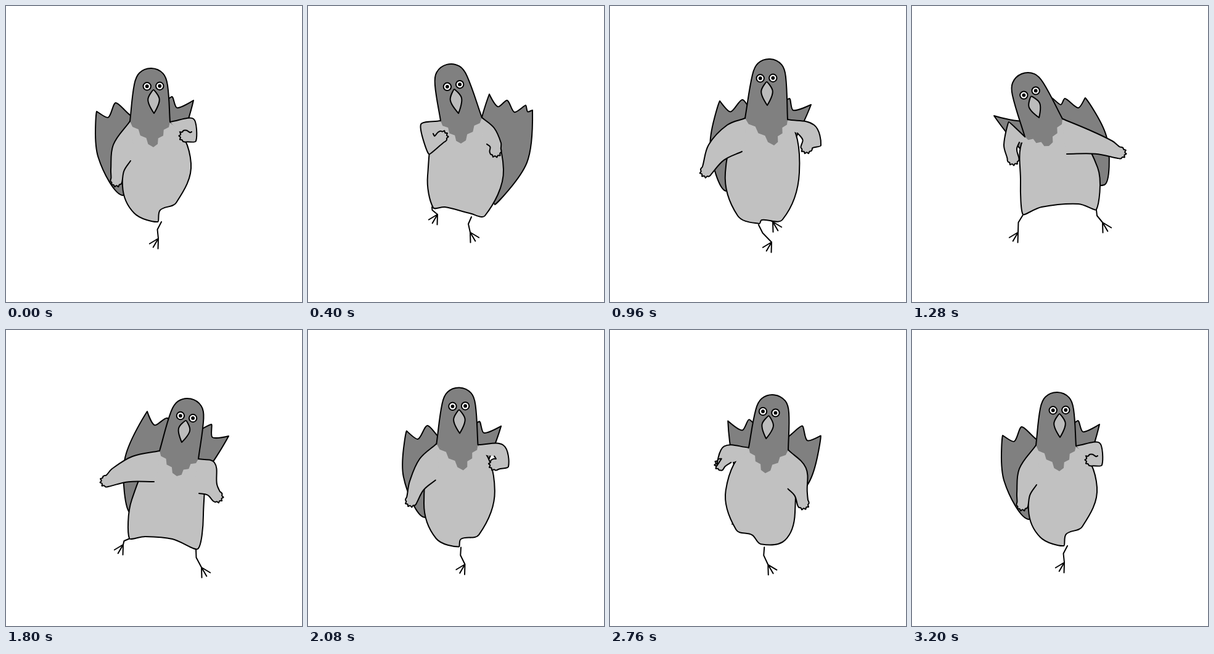
Write an HTML page with a canvas that moves like this. It is 480 px wide and 480 px high and loops after 3240 ms.

```html
<!DOCTYPE html>
<html>
<head>
<meta charset="utf-8">
<style>
html, body { margin: 0; width: 100%; height: 100%; overflow: hidden; background: #fff; }
canvas { display: block; width: 100vw; height: 100vh; }
</style>
</head>
<body>
<canvas id="stage" width="480" height="480"></canvas>
<script>
const ctx = document.getElementById('stage').getContext('2d');
const DARK = '#808080', LIGHT = '#c1c1c1', INK = '#000';
const CYCLE = 1080, STEP = 40, CROWN = 27, HAND = 9.5;

// Key joints as x,y pairs. Arms: two outer bends, hand, armpit. Legs: hip, foot.
const hop = {
  crown: [235,128], neck: [201,187, 266,188], tip: [239,229], face: [239,130], beak: [240,174],
  body: [189,292, 208,336, 246,350, 250,331, 276,319, 300,255],
  base: [190,307], peaks: [147,171, 178,157, 269,147, 304,153],
  armL: [174,225, 170,265, 179,283, 202,251], armR: [304,183, 308,219, 291,211, 301,204],
  legL: [252,350, 247,377], legR: [262,310, 262,295]
};
const leanLeft = {
  crown: [188,135], neck: [183,212, 244,183], tip: [222,227], face: [191,141], beak: [206,181],
  body: [176,285, 180,338, 210,326, 270,321, 299,330, 301,262],
  base: [312,290], peaks: [133,178, 222,147, 248,150, 281,149],
  armL: [157,188, 149,225, 164,248, 174,221], armR: [285,200, 325,219, 337,238, 251,240],
  legL: [181,337, 172,367], legR: [299,331, 309,351]
};
const punch = {
  crown: [232,121], neck: [215,186, 282,181], tip: [248,223], face: [236,129], beak: [244,174],
  body: [194,275, 203,327, 222,326, 262,336, 287,340, 317,265],
  base: [303,322], peaks: [294,143, 323,153, 353,161, 364,169],
  armL: [183,192, 196,240, 217,212, 203,207], armR: [302,198, 313,222, 304,235, 290,224],
  legL: [201,326, 210,338], legR: [265,342, 263,367]
};
const leanRight = {
  crown: [294,138], neck: [249,196, 312,209], tip: [277,237], face: [293,141], beak: [285,182],
  body: [204,275, 200,338, 226,335, 270,339, 311,355, 320,300],
  base: [202,297], peaks: [229,132, 262,143, 333,153, 361,172],
  armL: [205,205, 172,225, 163,245, 240,246], armR: [338,215, 342,250, 342,270, 313,265],
  legL: [201,338, 190,348], legR: [308,355, 317,385]
};
const rise = {
  crown: [258,113], neck: [219,182, 288,184], tip: [266,226], face: [254,117], beak: [255,161],
  body: [187,270, 207,340, 242,353, 246,347, 280,346, 307,270],
  base: [188,300], peaks: [178,154, 215,152, 291,150, 326,160],
  armL: [190,193, 160,225, 156,268, 214,236], armR: [331,193, 342,226, 319,229, 304,206],
  legL: [241,355, 262,383], legR: [262,346, 264,350]
};

const pairs = a => Array.from({ length: a.length / 2 }, (_, i) => [a[2 * i], a[2 * i + 1]]);

// Left-right reflection: limbs swap sides, outlines run the other way.
function mirror(pose) {
  const out = {};
  for (const part in pose) {
    const pts = pairs(pose[part]).map(([x, y]) => [482 - x, y]);
    const limb = /^(arm|leg)/.test(part);
    const name = limb ? part.slice(0, 3) + (part.endsWith('L') ? 'R' : 'L') : part;
    out[name] = (limb ? pts : pts.reverse()).flat();
  }
  return out;
}

const keys = [
  [0, hop], [200, leanLeft], [400, punch], [540, mirror(hop)],
  [720, leanRight], [960, rise], [1040, hop]
];

function keyAt(i) {
  const n = keys.length, turn = Math.floor(i / n);
  const [t, pose] = keys[i - turn * n];
  return [t + turn * CYCLE, pose];
}

// Harmonic mean keeps the motion between keys free of overshoot.
const slope = (a, b) => a * b > 0 ? 2 * a * b / (a + b) : 0;

function poseAt(t) {
  let i = keys.length - 1;
  while (keys[i][0] > t) i--;
  const [k0, k1, k2, k3] = [-1, 0, 1, 2].map(d => keyAt(i + d));
  const h = k2[0] - k1[0], u = (t - k1[0]) / h;
  const w = u * u * (3 - 2 * u), out = {};
  for (const part in hop) {
    out[part] = pairs(k1[1][part].map((b, j) => {
      const a = k0[1][part][j], c = k2[1][part][j], d = k3[1][part][j];
      const s = (c - b) / h;
      const m1 = slope((b - a) / (k1[0] - k0[0]), s);
      const m2 = slope(s, (d - c) / (k3[0] - k2[0]));
      return b + (c - b) * w + h * u * (1 - u) * ((1 - u) * m1 - u * m2);
    }));
  }
  return out;
}

const lerp = (a, b, u) => [a[0] + (b[0] - a[0]) * u, a[1] + (b[1] - a[1]) * u];
const dist = (a, b) => Math.hypot(b[0] - a[0], b[1] - a[1]) || 1;
const angle = (a, b) => Math.atan2(b[1] - a[1], b[0] - a[0]);
const polar = (c, r, a) => [c[0] + r * Math.cos(a), c[1] + r * Math.sin(a)];
const toward = (a, b, d) => lerp(a, b, d / dist(a, b));
// Point at u along a-b, pushed sideways by d.
const beside = (a, b, u, d) => polar(lerp(a, b, u), d, angle(a, b) - Math.PI / 2);

// Smooth curve through points; sharp turns stay sharp.
function trace(pts, closed) {
  const n = pts.length;
  const at = i => closed ? pts[(i + n) % n] : pts[Math.max(0, Math.min(n - 1, i))];
  const handle = i => {
    const a = at(i - 1), b = at(i), c = at(i + 1);
    const turn = a === b || b === c ? 0 : angle(b, c) - angle(a, b);
    const k = Math.max(0, Math.min(1, Math.cos(turn) + 0.6)) * 0.35;
    return [(c[0] - a[0]) / dist(a, c) * k, (c[1] - a[1]) / dist(a, c) * k];
  };
  ctx.beginPath();
  ctx.moveTo(...pts[0]);
  for (let i = 0; i < (closed ? n : n - 1); i++) {
    const p = at(i), q = at(i + 1), g = handle(i), e = handle(i + 1), d = dist(p, q);
    ctx.bezierCurveTo(p[0] + g[0] * d, p[1] + g[1] * d, q[0] - e[0] * d, q[1] - e[1] * d, ...q);
  }
  if (closed) ctx.closePath();
}

function fill(color) { ctx.fillStyle = color; ctx.fill(); }
function shape(pts, color) { trace(pts, true); fill(color); ctx.stroke(); }
function line(pts) { trace(pts, false); ctx.stroke(); }

function disc(c, r, color) {
  ctx.beginPath();
  ctx.arc(...c, r, 0, 7);
  fill(color);
}

function tail(base, peaks) {
  const last = peaks[peaks.length - 1];
  const pts = [base, beside(base, peaks[0], 0.5, 0.14 * dist(base, peaks[0]))];
  peaks.forEach((p, i) => {
    pts.push(p);
    const q = peaks[i + 1];
    if (q) pts.push(toward(lerp(p, q, 0.5), base, Math.min(32, dist(p, q) / 2)));
  });
  pts.push(beside(base, last, 0.5, -0.14 * dist(base, last)));
  shape(pts, DARK);
}

function leg([hip, foot], heading) {
  const [x, y] = lerp(hip, foot, 0.5);
  ctx.beginPath();
  ctx.moveTo(...hip);
  ctx.lineTo(x - 4, y - 1);
  ctx.lineTo(...foot);
  for (const spread of [-0.5, 0, 0.5]) {
    ctx.moveTo(...foot);
    ctx.lineTo(...polar(foot, 16.5, heading + spread));
  }
  ctx.stroke();
}

// The shoulder side is filled slightly into the body to hide its edge.
function arm(shoulder, [bend, wrist, hand, pit], side, mid) {
  const aim = angle(lerp(wrist, pit, 0.5), hand);
  const pts = [shoulder, bend, wrist];
  for (let i = 0; i <= 12; i++) {
    const r = HAND + (i > 2 && i < 10 ? 1.2 * Math.cos(i * Math.PI) : 0);
    pts.push(polar(hand, r, aim + side * 1.75 * (1 - i / 6)));
  }
  pts.push(lerp(lerp(pts[pts.length - 1], pit, 0.5), wrist, 0.15), pit);
  trace(pts, false);
  ctx.lineTo(...toward(lerp(shoulder, pit, 0.5), mid, 8));
  fill(LIGHT);
  line(pts);
}

function jag(a, b) {
  for (let i = 1; i <= 6; i++) {
    ctx.lineTo(...beside(a, b, i / 6, i === 6 ? 0 : i % 2 ? 3 : -1.5));
  }
}

function head({ crown: [crown], neck: [left, right], tip: [tip], face: [face], beak: [beak] }) {
  const up = angle(lerp(left, right, 0.5), crown);
  const arc = [-2, -1, 0, 1, 2].map(i => polar(crown, CROWN, up + i * Math.PI / 4));
  const dome = [left, ...arc, right];
  trace(dome, false);
  jag(tip, right);
  ctx.lineTo(...right);
  trace(dome, false);
  const edge = (a, b) => jag(a, b);
  edge(right, tip);
  edge(tip, left);
  fill(DARK);
  line(dome);
  for (const d of [-10.3, 10.3]) {
    const eye = beside(face, beak, 0, d);
    disc(eye, 6.2, '#fff');
    ctx.stroke();
    disc(eye, 2.9, INK);
  }
  const top = toward(face, beak, 6);
  shape([top, beside(top, beak, 0.42, 9.3), beak, beside(top, beak, 0.42, -9.3)], '#bcbcbc');
}

function draw(p) {
  const [left, right] = p.neck;
  const mid = lerp(p.body[0], p.body[5], 0.5);
  ctx.fillStyle = '#fff';
  ctx.fillRect(0, 0, 480, 480);
  ctx.strokeStyle = INK;
  ctx.lineWidth = 2;
  ctx.lineCap = ctx.lineJoin = 'round';
  tail(p.base[0], p.peaks);
  leg(p.legL, 2.1);
  leg(p.legR, 1.04);
  shape([left, ...p.body, right], LIGHT);
  arm(left, p.armL, 1, mid);
  arm(right, p.armR, -1, mid);
  head(p);
}

function frame() {
  const t = Math.floor(performance.now() / STEP) * STEP;
  draw(poseAt(t % CYCLE));
  requestAnimationFrame(frame);
}
frame();
</script>
</body>
</html>
```
